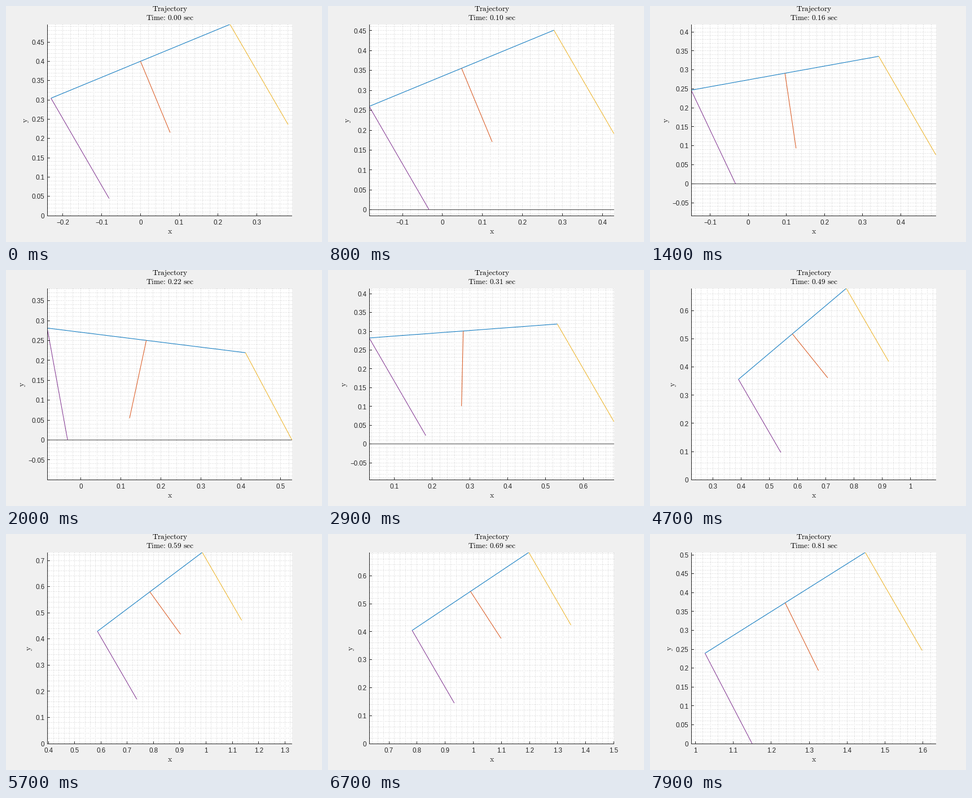
Animation of 560x420 px, one loop 8 s. Source, as a matplotlib script:

```python
import math

import matplotlib.pyplot as plt
import numpy as np
from matplotlib.animation import FuncAnimation
from matplotlib.collections import LineCollection
from matplotlib.patches import Rectangle

plt.rcParams["mathtext.fontset"] = "cm"

W, H, DPI = 560, 420, 100
PX = 72 / DPI                       # one pixel in points
FRAMES, STEP_MS = 80, 100

# plot box in pixels
LEFT, RIGHT, TOP, BOTTOM = 73.0, 506.7, 32.7, 373.1
INK = "#262626"

HALF_BODY, LEG, PENDULUM = 0.25, 0.3, 0.2
SWING = math.radians(30)            # leg angle while in the air
FALL = np.array([0, -9.81, 0, 0])
TOUCHDOWN = 0.0953

# free flights: start, end, then [x, y, body angle, pendulum angle] and rates
FLIGHTS = [
    (0.000, TOUCHDOWN, [0, 0.4, 22.5, 22.5], [0.5, 0, 0, 0]),
    (0.298, 0.363, [0.266, 0.285, -1.3, -7.3], [1.34, 1.38, 463, 496]),
    (0.449, 0.690, [0.4984, 0.4642, 41.6, 39.9], [2.04, 1.513, -32, -29]),
    (0.810, 0.900, [1.2366, 0.373, 32.3, 26.1], [2.05, -1.9, 0, -80]),
]

# stance phases: start, end, foot x
REAR_STANCE = [(TOUCHDOWN, 0.248, -0.0335), (0.363, 0.449, 0.2877), (0.80, 1, 1.1496)]
FRONT_STANCE = [(0.194, 0.298, 0.528)]


def sim_time(i):
    return i * TOUCHDOWN / 8 if i <= 8 else round(0.02 + 0.01 * i, 4)


def ballistic(flight, t):
    start, _, pos, vel = flight
    dt = t - start
    vel = np.array(vel)
    return np.array(pos) + vel * dt + FALL * dt * dt / 2, vel + FALL * dt


def state(t):
    """Free flight, or a cubic Hermite push from one flight to the next."""
    k = max(i for i, f in enumerate(FLIGHTS) if f[0] <= t)
    end = FLIGHTS[k][1]
    if t <= end:
        return ballistic(FLIGHTS[k], t)[0]
    after = FLIGHTS[k + 1]
    p, u = ballistic(FLIGHTS[k], end)
    q, v = ballistic(after, after[0])
    h = after[0] - end
    s = (t - end) / h
    return ((1 + 2 * s) * (1 - s) ** 2 * p + s * (1 - s) ** 2 * h * u
            + s * s * (3 - 2 * s) * q + s * s * (s - 1) * h * v)


def foot(t, hip, stances):
    for start, end, x in stances:
        if start <= t < end:
            return np.array([x, 0.0])
    return hip + LEG * np.array([math.sin(SWING), -math.cos(SWING)])


def segments(t):
    x, y, body, pend = state(t)
    body, pend = math.radians(body), math.radians(pend)
    c = np.array([x, y])
    arm = HALF_BODY * np.array([math.cos(body), math.sin(body)])
    rear, front = c - arm, c + arm
    bob = c + PENDULUM * np.array([math.sin(pend), -math.cos(pend)])
    return np.array([
        [rear, front],
        [c, bob],
        [front, foot(t, front, FRONT_STANCE)],
        [rear, foot(t, rear, REAR_STANCE)],
    ])


def multiples(lo, hi, step):
    first = math.ceil(lo / step - 1e-6)
    last = math.floor(hi / step + 1e-6)
    return [k * step for k in range(first, last + 1)]


def label(v):
    return f"{round(v, 2):g}".replace("-", "\u2212")


def crisp(p):
    return math.floor(p) + 0.5


fig = plt.figure(figsize=(W / DPI, H / DPI), dpi=DPI, facecolor="#f0f0f0")
ax = fig.add_axes([0, 0, 1, 1])
ax.set_xlim(0, W)
ax.set_ylim(H, 0)
ax.axis("off")

box = Rectangle((73, 33), 434, 341, fc="white", ec="none", zorder=0)
ax.add_patch(box)


def line_set(color, z, width=1.0, **kw):
    lines = LineCollection([], colors=color, linewidths=width * PX, zorder=z,
                           snap=False, **kw)
    ax.add_collection(lines, autolim=False)
    return lines


def text(x, y, s, size, color="black", **kw):
    return ax.text(x, y, s, fontsize=size * PX, color=color, **kw)


def tick_labels(ha):
    return [text(0, 0, "", 11.6, INK, ha=ha, va="baseline", family="Liberation Sans")
            for _ in range(15)]


grid = line_set("#cccccc", 1, linestyles=[(0, (1, 2))])
ground = line_set("black", 2, 0.7)
limbs = line_set(["#0072bd", "#d95319", "#edb120", "#7e2f8e"], 3)
limbs.set_clip_path(box)
frame_lines = line_set(INK, 4)

text(290.5, 9, r"$\text{Trajectory}$", 13.3, ha="center", va="baseline")
clock = text(290.5, 25, "", 13.3, ha="center", va="baseline")
text(290.5, 401, r"$\mathrm{x}$", 14, INK, ha="center", va="center")
y_name = text(36, 203, r"$\mathrm{y}$", 14, INK, ha="center", va="center", rotation=90)
x_labels, y_labels = tick_labels("center"), tick_labels("right")


def show_labels(pool, items):
    for t in pool:
        t.set_text("")
    for t, (x, y, s) in zip(pool, items):
        t.set_position((x, y))
        t.set_text(s)


def update(i):
    t = sim_time(i)
    segs = segments(t)

    # equal scaling around the data, with the ground always in view
    xs, ys = segs[..., 0], segs[..., 1]
    x_lo, x_hi = xs.min(), xs.max()
    y_lo, y_hi = min(ys.min(), 0), ys.max()
    scale = min((RIGHT - LEFT) / (x_hi - x_lo), (BOTTOM - TOP) / (y_hi - y_lo))
    half_w, half_h = (RIGHT - LEFT) / scale / 2, (BOTTOM - TOP) / scale / 2
    x0, x1 = (x_lo + x_hi) / 2 - half_w, (x_lo + x_hi) / 2 + half_w
    y0, y1 = (y_lo + y_hi) / 2 - half_h, (y_lo + y_hi) / 2 + half_h

    def px(x):
        return LEFT + (x - x0) * scale

    def py(y):
        return BOTTOM - (y - y0) * scale

    limbs.set_segments(np.stack([px(xs), py(ys)], axis=-1))
    ground_y = crisp(py(0))
    ground.set_segments([[(73, ground_y), (507, ground_y)]])

    x_step, y_step = 0.1, 0.05 if scale > 640 else 0.1
    grid.set_segments(
        [[(crisp(px(v)), 33), (crisp(px(v)), 373)] for v in multiples(x0, x1, x_step / 5)]
        + [[(74, crisp(py(v))), (507, crisp(py(v)))] for v in multiples(y0, y1, y_step / 5)])

    x_ticks, y_ticks = multiples(x0, x1, x_step), multiples(y0, y1, y_step)
    frame_lines.set_segments(
        [[(73.5, 33), (73.5, 374)], [(73, 373.5), (507, 373.5)]]
        + [[(crisp(px(v)), 369), (crisp(px(v)), 374)] for v in x_ticks]
        + [[(73, crisp(py(v))), (78, crisp(py(v)))] for v in y_ticks])

    show_labels(x_labels, [(px(v), 389, label(v)) for v in x_ticks])
    show_labels(y_labels, [(68.3, py(v) + 4.7, label(v)) for v in y_ticks])
    y_name.set_x(60 - 6 * max(len(label(v)) for v in y_ticks))
    clock.set_text(rf"$\text{{Time: {t:.2f} sec}}$")
    return []


anim = FuncAnimation(fig, update, frames=FRAMES, interval=STEP_MS,
                     repeat=True, repeat_delay=0, blit=False)
plt.show()
```
